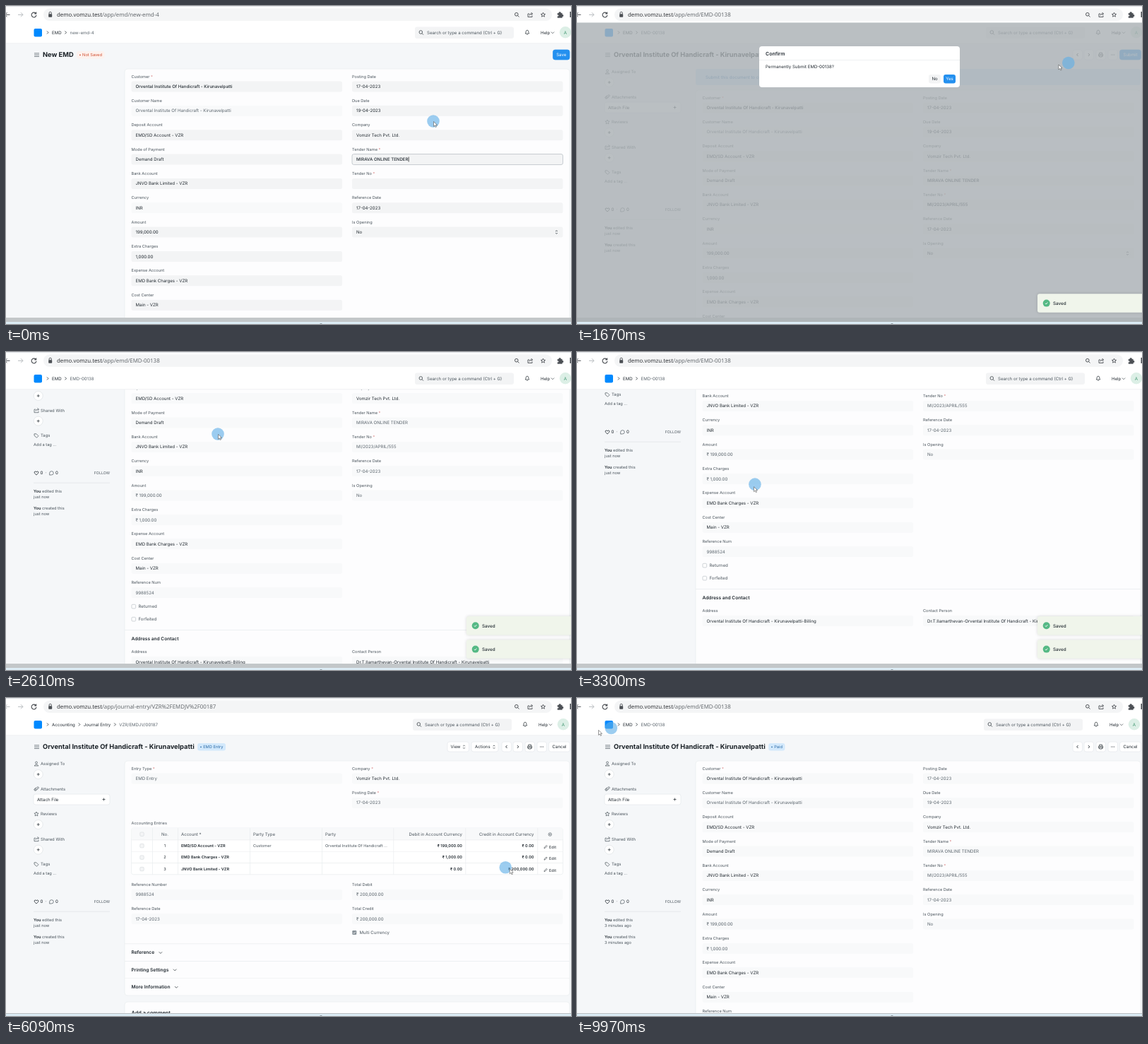
Recreate the animation shown at these times as an HTML page with a canvas. Size 800 by 450 pixels, loop 10000 ms.

```html
<!DOCTYPE html>
<html lang="en">
<head>
<meta charset="utf-8">
<title>Deposit entry walkthrough</title>
<style>
html, body { margin: 0; width: 100%; height: 100%; overflow: hidden; background: #f5f7f9; }
canvas { display: block; width: 800px; height: 450px; }
</style>
</head>
<body>
<canvas id="stage" width="800" height="450"></canvas>
<script>
const g = document.getElementById('stage').getContext('2d');
g.textRendering = 'geometricPrecision';

const INK = '#232b32', MUTE = '#5c666e', LABEL = '#4c565e', BLUE = '#2490ef';
const PAGE = '#f5f7f9', CARD = '#fdfdfe', EDIT = '#f3f4f5', READ = '#f8f9fa', RULE = '#e9ecee';
const HOST = 'demo.vomzu.test';
const CLIENT = 'Orvental Institute Of Handicraft - Kirunavelpatti';
const COMPANY = 'Vomzir Tech Pvt. Ltd.';
const DEPOSIT = 'EMD/SD Account - VZR', BANK = 'JNVO Bank Limited - VZR', CHARGES = 'EMD Bank Charges - VZR';
const TENDER_NO = 'MI/2023/APRIL/555';

const ICON = {
  user: 'M-1.5-1.5a1.5 1.5 0 1 1 3 0a1.5 1.5 0 1 1-3 0M-3 3q3-4 6 0z',
  clip: 'M2-1l-2.5 2.5q-1.5 .8-1.5-.8l3-3q2-1.2 2.5 .8l-4 4q-2.2 1-2.8-1.5l2.5-2.8',
  star: 'M0-3l.9 2 2.2 .2-1.7 1.5 .5 2.2-1.9-1.2-1.9 1.2 .5-2.2-1.7-1.5 2.2-.2z',
  tag: 'M-3-2.5h3l3 3-2.5 2.5-3.5-3zM-1.6-1.2v.2',
  heart: 'M0 2.8l-2.6-2.6q-1-2 .8-2.6q1.2 0 1.8 1.2q.6-1.2 1.8-1.2q1.8 .6 .8 2.6z',
  bubble: 'M-2.8 2.8v-3a2.8 2.6 0 1 1 2.8 2.8z',
  bell: 'M-2.8 1.5q1-1 1-3q.3-1.8 1.8-1.8t1.8 1.8q0 2 1 3zM-.8 2.6q.8 .8 1.6 0',
  search: 'M-3-.5a2.3 2.3 0 1 1 4.6 0a2.3 2.3 0 1 1-4.6 0M1 1.2l2 2',
  share: 'M-1-1.5h-2v4.5h6v-2M-1 1q0-2.5 3-2.5h1.5M1.5-3.5l2 2-2 2',
  reload: 'M2.6-2a3.4 3.4 0 1 0 .8 2.6M3.2-3.8v2.4h-2.4',
  print: 'M-1.8-.8v-2.2h3.6v2.2M-1.8 1.8h-1.2v-2.6h6v2.6h-1.2M-1.8 .8h3.6v2.2h-3.6z',
  puzzle: 'M-3.5-2h2a1.3 1.3 0 1 1 2.4 0h2v2.2a1.2 1.2 0 1 1 0 2.2v1.9h-6.4v-2a1.2 1.2 0 1 0 0-2.2z',
  down: 'M-2.2-1.1l2.2 2.2 2.2-2.2',
  right: 'M-1-2l2 2-2 2',
  left: 'M1-2l-2 2 2 2',
  sort: 'M-1.3-1l1.3-1.3 1.3 1.3M-1.3 1l1.3 1.3 1.3-1.3',
  plus: 'M-2 0h4M0-2v4',
  menu: 'M-3.5-2.3h7M-3.5 0h7M-3.5 2.3h7',
  back: 'M3.5 0h-7M-.5-3l-3 3 3 3',
  forward: 'M-3.5 0h7M.5-3l3 3-3 3',
  pencil: 'M-2 2l.4-1.4 2.8-2.8 1 1-2.8 2.8z',
  check: 'M-1.7 .1l1.1 1.2 2.2-2.4',
  lock: 'M-1.6-.3v-1.6a1.6 1.6 0 0 1 3.2 0v1.6',
  arrow: 'M0 0v7l1.7-1.6 1.2 2.6 1.2-.6-1.2-2.5h2.2z',
  beam: 'M-1.5-4h3M0-4v8M-1.5 4h3'
};

function icon(name, x, y, color = LABEL, width = .7, fill) {
  const path = new Path2D(ICON[name]);
  g.save();
  g.translate(x, y);
  g.lineWidth = width;
  if (fill) { g.fillStyle = fill; g.fill(path); }
  g.strokeStyle = color;
  g.stroke(path);
  g.restore();
}

// y is the middle of the capitals
function text(s, x, y, size = 6.1, color = INK, weight = 400, align = 'left', face = 'Inter') {
  g.font = `${weight} ${size}px "${face}", sans-serif`;
  g.fillStyle = color;
  g.textAlign = align;
  g.fillText(s, x, y + size * .36);
  return g.measureText(s).width;
}

function box(x, y, w, h, fill, r = 2, stroke) {
  g.beginPath();
  g.roundRect(x, y, w, h, r);
  if (fill) { g.fillStyle = fill; g.fill(); }
  if (stroke) { g.strokeStyle = stroke; g.lineWidth = .7; g.stroke(); }
}

const disc = (x, y, r, fill, stroke) => box(x - r, y - r, 2 * r, 2 * r, fill, r, stroke);
const rule = (x, y, w, h = .7) => box(x, y, w, h, RULE, 0);
const clamp = v => Math.max(0, Math.min(1, v));
const ease = v => 1 - (1 - clamp(v)) ** 3;

// linear interpolation through [time, ...values] rows
function track(keys, t) {
  const i = keys.findIndex(k => k[0] > t);
  if (i < 1) return keys.at(i).slice(1);
  const a = keys[i - 1], b = keys[i], p = (t - a[0]) / (b[0] - a[0]);
  return a.slice(1).map((v, n) => v + (b[n + 1] - v) * p);
}

function label(s, x, y) {
  const star = s.endsWith('*');
  const w = text(star ? s.slice(0, -1) : s, x, y, 5.65, LABEL);
  if (star) text('*', x + w, y, 5.65, '#d98080');
}

function field(name, value, x, y, { fill = READ, color = INK, weight = 400, focus } = {}) {
  label(name, x, y);
  box(x, y + 7, 298.5, 15, fill, 2.5, focus && '#b4bac0');
  const w = text(value, x + 6, y + 14.4, 6.1, color, weight);
  if (focus) box(x + 6.3 + w, y + 11, .7, 7, '#111', 0);
}

function browser(path, fresh) {
  box(0, 0, 800, 23.5, '#fff', 0);
  box(0, 0, 800, 1, '#dfe2e6', 0);
  box(53, 3.5, 720, 17.5, '#f4f5f6', 9);
  const dark = '#4b4f54', pale = '#b8bcc0';
  icon('back', 2, 12.3, fresh ? pale : dark, 1);
  icon('forward', 20.5, 12.3, pale, 1);
  icon('reload', 39.5, 12.3, dark, 1.1);
  box(60.2, 11.3, 5, 4.4, dark, .7);
  icon('lock', 62.7, 11.8, dark, .9);
  const w = text(HOST, 72, 12.3, 7.9, '#25282c', 400, 'left', 'Open Sans');
  text('/app/' + path, 72 + w, 12.3, 7.9, '#5c6166', 400, 'left', 'Open Sans');
  icon('search', 723.5, 12.3, dark, 1);
  icon('share', 742, 12.5, dark, .9);
  icon('star', 760.5, 12.3, dark, .9);
  icon('puzzle', 784.5, 12.3, dark, .5, dark);
  box(798.5, 8, 2, 8, dark, 0);
}

function navbar(crumbs, dx) {
  box(0, 23, 800, 30, '#fff', 0);
  rule(0, 52.5, 800);
  box(39.5, 32, 11.5, 11.5, '#0089ff', 2);
  let x = 65;
  crumbs.forEach((s, i) => {
    icon('right', x - 6, 37.5, INK, .8);
    x += 12 + text(s, x, 37.5, 6.1, i < crumbs.length - 1 ? INK : MUTE);
  });
  box(579 + dx, 29.5, 140, 16.5, EDIT, 3);
  icon('search', 588 + dx, 37.5, INK);
  text('Search or type a command (Ctrl + G)', 596 + dx, 37.5, 6.1, LABEL);
  icon('bell', 738 + dx, 37.5, INK);
  text('Help', 757 + dx, 37.5, 6.1, INK);
  icon('down', 774 + dx, 37.7, INK, .6);
  disc(792 + dx, 37.3, 8.2, '#dcefe6');
  text('A', 792 + dx, 37.5, 6.3, '#4a9b78', 400, 'center');
}

function heading(title, status, red) {
  icon('menu', 43.5, 69.2, MUTE, .8);
  const x = 56.5 + text(title, 52, 69, 9.3, '#1a2127', 700);
  g.font = '400 5.7px Inter, sans-serif';
  const w = g.measureText(status).width, tone = red ? '#cf4a2c' : '#2c6ca8';
  box(x, 64, w + 11.5, 10.5, red ? '#fdf2ee' : '#d3e9fc', 3);
  disc(x + 4.8, 69.3, .9, tone);
  text(status, x + 8, 69.3, 5.7, tone);
}

function button(x, w, s, main) {
  box(x, 62, w, 14, main ? BLUE : '#fff', 3, main ? BLUE : '#e6e9ec');
  if (s) text(s, x + w / 2, 69.2, 6.1, main ? '#fff' : INK, 400, 'center');
}

function tools() {
  [702, 718, 735, 752].forEach(x => button(x, 13.5));
  icon('left', 708.6, 69, INK, .9);
  icon('right', 724.8, 69, INK, .9);
  icon('print', 741.6, 69, INK);
  [-2, 0, 2].forEach(d => disc(758.7 + d, 69, .6, INK));
}

function sidebar(ago) {
  const head = (name, s, y, add) => {
    icon(name, 43, y, LABEL, .7);
    text(s, 49, y, 5.9, LABEL);
    if (!add) return;
    disc(45.7, y + 15, 6.5, '#fff', '#dde1e4');
    icon('plus', 45.7, y + 15, INK);
  };
  head('user', 'Assigned To', 93, true);
  head('clip', 'Attachments', 128.5);
  box(39, 136, 108, 15, '#fff', 3, '#e4e8eb');
  text('Attach File', 44, 143.5, 6.1);
  icon('plus', 138.5, 143.5, INK);
  head('star', 'Reviews', 164, true);
  head('share', 'Shared With', 199.7, true);
  head('tag', 'Tags', 235.3);
  text('Add a tag ...', 39, 247.8, 5.7, LABEL);
  icon('heart', 43, 288.3, INK, .8);
  text('0  ·', 48.5, 288.3, 6.1, INK);
  icon('bubble', 64.5, 288.3, LABEL);
  text('0', 70, 288.3, 6.1, INK);
  text('FOLLOW', 147, 288.3, 5.3, LABEL, 400, 'right');
  box(39, 301.7, 108, .8, '#dfe3e6', 0);
  ['edited', 'created'].forEach((s, i) => {
    const w = text('You', 39, 314 + 24 * i, 5.7, INK, 600);
    text(` ${s} this`, 39 + w, 314 + 24 * i, 5.7, LABEL);
    text(ago, 39, 322.3 + 24 * i, 5.7, LABEL);
  });
}

// kinds: b strong, m muted, r read-only, d plain data, n money, t tender
const LEFT = [
  ['Customer *', CLIENT, 'b'], ['Customer Name', CLIENT, 'm'], ['Deposit Account', DEPOSIT],
  ['Mode of Payment', 'Demand Draft'], ['Bank Account', BANK], ['Currency', 'INR', 'r'],
  ['Amount', '199,000.00', 'n'], ['Extra Charges', '1,000.00', 'n'],
  ['Expense Account', CHARGES], ['Cost Center', 'Main - VZR'], ['Reference Num', '9988524', 'd']
];
const RIGHT = [
  ['Posting Date', '17-04-2023', 'd'], ['Due Date', '19-04-2023', 'd'], ['Company', COMPANY],
  ['Tender Name *', 'MIRAVA ONLINE TENDER', 't'], ['Tender No *', TENDER_NO, 't'],
  ['Reference Date', '17-04-2023', 'd'], ['Is Opening', 'No', 'd']
];

function deposit(mode, t, scroll = 0, ago = 'just now') {
  const fresh = mode === 'new', done = mode === 'done', dy = mode === 'draft' ? 30 : 0;
  g.save();
  g.translate(0, -scroll);
  heading(fresh ? 'New EMD' : CLIENT, fresh ? 'Not Saved' : done ? 'Paid' : 'Draft', !done);
  if (fresh) button(774.5, 23.5, 'Save', true);
  else {
    tools();
    button(768.5, 30, done ? 'Cancel' : 'Submit', !done);
    sidebar(ago);
  }
  if (dy) {
    box(168, 89, 630, 23, '#cfe5fb', 3);
    text('Submit this document to confirm', 182, 100.4, 6.1, '#2f74b5');
  }
  box(168, 89 + dy, 630, 800, CARD, 4, RULE);
  const column = (rows, x) => rows.forEach(([name, value, kind = '-'], i) => {
    const style = { fill: done || 'mr'.includes(kind) ? READ : EDIT };
    if (kind === 'm' || done && 'dnt'.includes(kind)) style.color = MUTE;
    if (!done && 'bt'.includes(kind)) style.weight = 500;
    if (done && kind === 'n') value = '₹ ' + value;
    if (fresh && name === 'Tender No *') {
      value = value.slice(0, Math.floor(value.length * clamp((t - 150) / 400)));
      style.focus = t >= 120;
    }
    if (fresh && name === 'Tender Name *') style.focus = t < 120;
    field(name, value, x, 99.5 + dy + 34.35 * i, style);
  });
  column(done ? LEFT : LEFT.slice(0, 10), 177.5);
  column(RIGHT, 490);
  if (!done) icon('sort', 779.5, 320 + dy, INK, .8);
  else {
    ['Returned', 'Forfeited'].forEach((s, i) => {
      box(178, 474.3 + 18 * i, 5.6, 5.6, '#fff', 1.2, '#b9c0c6');
      text(s, 187.5, 477.2 + 18 * i, 6.1, LABEL);
    });
    rule(168, 510, 630);
    text('Address and Contact', 177.5, 523, 6.6, INK, 600);
    field('Address', CLIENT + '-Billing', 177.5, 541);
    field('Contact Person', 'Dr.T.Ilamarthevan-' + CLIENT, 490, 541);
  }
  g.restore();
}

function journal() {
  heading(CLIENT, 'EMD Entry');
  button(625, 30.5);
  text('View', 629.5, 69.2);
  icon('sort', 648.5, 69.2, INK);
  button(659, 38);
  text('Actions', 664, 69.2);
  icon('sort', 691, 69.2, INK);
  tools();
  button(768.5, 30, 'Cancel');
  sidebar('just now');
  box(168, 89, 630, 332, CARD, 4, RULE);
  const soft = { color: MUTE };
  field('Entry Type *', 'EMD Entry', 177.5, 99.5, soft);
  field('Company *', COMPANY, 490, 99.5);
  field('Posting Date *', '17-04-2023', 490, 133.8, soft);
  text('Accounting Entries', 177.5, 177, 5.65, LABEL);

  const top = 184, row = 16.45;
  box(177.5, top, 611, row * 4, '#fff', 3, RULE);
  box(177.5, top, 611, row, READ, 3);
  for (let i = 1; i < 4; i++) rule(177.5, top + row * i, 611);
  [207, 243, 345, 447, 548.5, 650.5, 752.5].forEach(x => rule(x, top, .7, row * 4));
  [['No.', 225, 'center'], ['Account *', 248], ['Party Type', 350], ['Party', 452],
   ['Debit in Account Currency', 646, 'right'], ['Credit in Account Currency', 747.5, 'right']]
    .forEach(([s, x, align]) => text(s, x, 192.7, 6.05, LABEL, 400, align));
  disc(770.3, 193, 2.3, null, MUTE);
  disc(770.3, 193, .8, null, MUTE);
  const entries = [
    [DEPOSIT, '199,000.00', '0.00'], [CHARGES, '1,000.00', '0.00'], [BANK, '0.00', '200,000.00']
  ];
  for (let i = 0; i < 4; i++) box(189.8, 190 + row * i, 5.4, 5.4, '#f4f5f6', 1.2, '#d9dde0');
  entries.forEach(([account, debit, credit], i) => {
    const y = 209 + row * i;
    text(i + 1, 225, y, 5.55, INK, 400, 'center');
    text(account, 248, y, 5.55, INK, 600);
    text('₹ ' + debit, 646, y, 5.55, INK, 600, 'right');
    text('₹ ' + credit, 747.5, y, 5.55, INK, 600, 'right');
    icon('pencil', 764, y + 1.7, INK, .6);
    text('Edit', 769, y + 1.7, 5.6, INK);
  });
  text('Customer', 350, 209, 5.55, LABEL);
  text(CLIENT.split(' - ')[0] + ' ...', 452, 209, 5.55, LABEL);

  field('Reference Number', '9988524', 177.5, 263.7, soft);
  field('Reference Date', '17-04-2023', 177.5, 298, soft);
  field('Total Debit', '₹ 200,000.00', 490, 263.7, soft);
  field('Total Credit', '₹ 200,000.00', 490, 298, soft);
  box(490.3, 329, 6, 6, '#8a939a', 1.2);
  icon('check', 493.3, 332, '#fff', .8);
  text('Multi Currency', 500.5, 332, 6.1, LABEL);
  ['Reference', 'Printing Settings', 'More Information'].forEach((s, i) => {
    const y = 360 + 24.4 * i;
    rule(168, y - 12.4, 630);
    icon('down', 186.3 + text(s, 177.5, y, 6.6, INK, 600), y + .4, INK);
  });
  box(168, 430, 630, 40, CARD, 4, RULE);
  text('Add a comment', 177.5, 445.5, 7.3, INK, 600);
}

function toast(y, shown) {
  if (shown <= 0) return;
  const x = 652 + 148 * (1 - shown);
  g.save();
  g.shadowColor = 'rgba(0,0,0,.15)';
  g.shadowBlur = 4;
  box(x, y, 160, 26.5, '#f0f5eb', 3);
  g.restore();
  disc(x + 12.7, y + 13.3, 5, '#55b985');
  icon('check', x + 12.7, y + 13.3, '#fff', 1);
  text('Saved', x + 22, y + 13.3, 6.3, INK, 500);
}

function confirmBox() {
  box(258, 57, 284, 58, '#fff', 4);
  text('Confirm', 267, 67, 7, INK, 600);
  rule(258, 76, 284);
  text('Permanently Submit EMD-00138?', 267, 86, 6.1, INK);
  box(498, 97, 17, 12.5, EDIT, 3);
  text('No', 506.5, 103.2, 6.1, INK, 400, 'center');
  box(519, 97, 17, 12.5, BLUE, 3);
  text('Yes', 527.5, 103.2, 6.1, '#fff', 400, 'center');
}

const PATH = [
  [90, 605, 163], [250, 640, 230], [500, 650, 248], [760, 786, 69], [940, 786, 69],
  [1190, 674, 136], [1215, 669, 139], [1400, 780, 69], [1520, 780, 69], [1900, 532, 103],
  [2120, 532, 103], [2500, 300, 116], [2750, 300, 116], [3300, 250, 190], [3800, 230, 300],
  [4010, 225, -16], [4420, 225, -16], [4700, 300, 60], [5000, 240, 190], [5300, 280, 209],
  [5700, 615, 212], [6100, 715, 242], [6500, 640, 226], [6900, 560, 280], [7270, 330, 70],
  [7580, 330, 70], [7800, 474, 107], [8050, 474, 107], [8350, 220, 130], [8580, 140, 45],
  [8850, 110, 45], [9250, 240, 180], [9700, 275, 90], [9850, 135, 31], [9970, 30, 45]
];

function pointer(t) {
  const [x, y] = track(PATH, t), [hx, hy] = track(PATH, t - 22);
  const pressed = t > 1920 && t < 2150;
  disc(hx, hy, 8.8, pressed ? 'rgba(58,142,204,.82)' : 'rgba(95,175,230,.62)');
  if (t > 1100 && t < 1290) icon('beam', x, y, '#333', .8);
  else icon('arrow', x + .5, y + .5, '#555', .6, '#fff');
}

function draw(t) {
  const inJournal = t >= 4030 && t < 8850, wide = t >= 4030;
  box(0, 0, 800, 450, PAGE, 0);
  if (t < 1000) deposit('new', t);
  else if (t < 2200) deposit('draft', t);
  else if (t < 4030) deposit('done', t, track([[2250, 0], [2590, 117], [2750, 117], [3300, 175]], t)[0]);
  else if (t >= 8850) deposit('done', t, 0, '3 minutes ago');
  else if (t >= 4270) journal();

  const doc = t < 1000 ? 'new-emd-4' : 'EMD-00138';
  navbar(inJournal ? ['Accounting', 'Journal Entry', 'VZR/EMDJV/00187'] : ['EMD', doc], wide ? -3 : 0);
  browser(inJournal ? 'journal-entry/VZR%2FEMDJV%2F00187' : 'emd/' + doc, inJournal);
  if (wide) box(0, 446, 800, 1, '#b9bec2', 0);
  else box(0, 441, 800, 6, '#c3c7c9', 0);
  if (t >= 1000 && t < 1260) {
    g.globalAlpha = .7;
    box(-5, 436, 281, 10.5, '#dee1e4', 2);
    g.globalAlpha = 1;
    text('iting for ' + HOST + '...', -1, 441.5, 5, '#777d82');
  }
  if (t >= 1480 && t < 2200) box(0, 23.5, 800, 423.5, 'rgba(171,177,181,.82)', 0);
  if (t >= 1480 && t < 1990) confirmBox();
  box(0, 447, 800, 3, '#dcecf5', 0);
  disc(446, 451, 2, '#8a959c');

  if (t < 4030) {
    const second = ease((t - 2300) / 200), leave = 1 - ease((t - 3400) / 200);
    toast(407.3 - 33.3 * second, ease((t - 1204) / 200) * leave);
    toast(407.3, second * leave);
  }
  if (t >= 7860 && t < 8060) {
    box(479.5, 116.5, 40.5, 11.5, '#fff', 0, '#8a8f94');
    text('voucher_type', 484, 122.3, 5.1, '#555', 400, 'left', 'Open Sans');
  }
  pointer(t);
}

function frame() {
  draw(performance.now() % 10000);
  requestAnimationFrame(frame);
}
frame();
</script>
</body>
</html>
```
